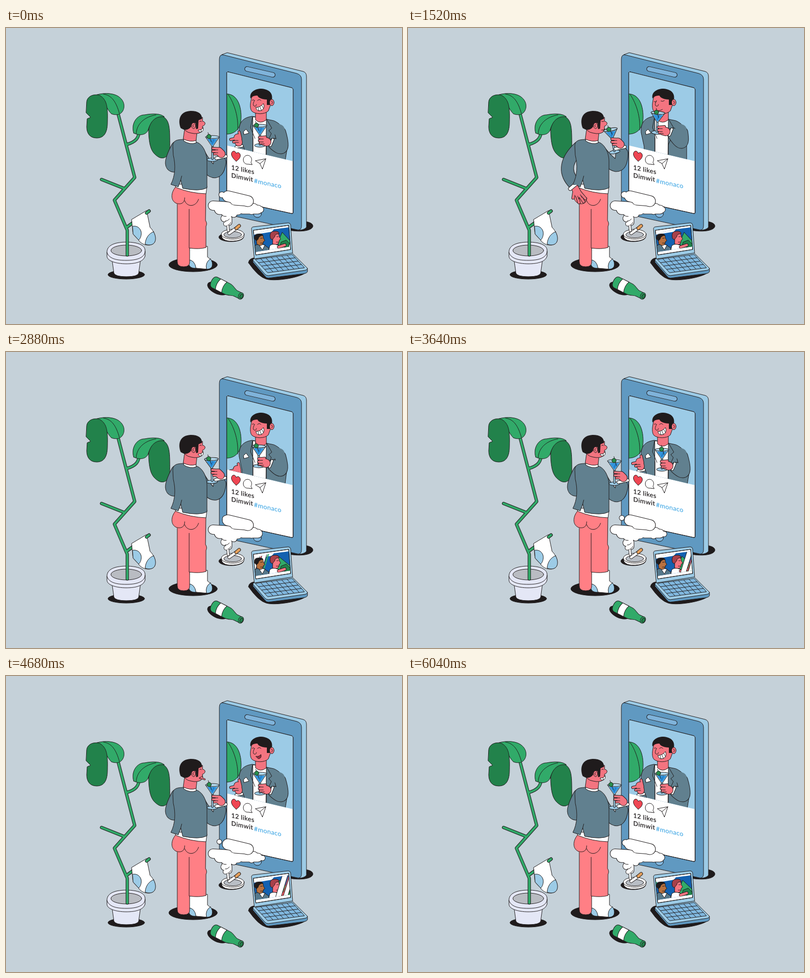
These frames come from a looping animation (800x600 px, 6.08 s). An HTML page with a canvas:

```html
<!DOCTYPE html>
<html lang="en">
<head>
<meta charset="utf-8">
<title>Cheers to the mirror</title>
<style>
html, body { margin: 0; width: 100%; height: 100%; overflow: hidden; background: #c5d1d9; }
canvas { display: block; }
</style>
</head>
<body>
<canvas id="stage" width="800" height="600"></canvas>
<script>
const c = document.getElementById('stage').getContext('2d');
const LOOP = 6080, STEP = 40, FLOW = 508;
const INK = '#1f1b1c', WHITE = '#fff', SKIN = '#f37480', PANTS = '#ff7f85', JACKET = '#61808f',
  SKY = '#9ccbe6', BLUE = '#6099c1', GREEN = '#31aa69', LEAF = '#22824b', POT = '#e4e7f6', LIQUID = '#3294dc';

c.lineCap = c.lineJoin = 'round';

// Fill and outline an SVG path
function shape(d, fill, line = INK, w = 1) {
  const p = new Path2D(d);
  if (fill) { c.fillStyle = fill; c.fill(p); }
  if (line) { c.strokeStyle = line; c.lineWidth = w; c.stroke(p); }
}
const line = (d, w = 1, col = INK) => shape(d, null, col, w);

// Thick strokes merged under one common outline
function limbs(parts, fill) {
  for (const [d, w] of parts) line(d, w + 1);
  for (const [d, w] of parts) line(d, w - 1, fill);
}
const dot = (x, y) => `M${x} ${y}h.01`;

function oval(x, y, rx, ry, fill, stroke = INK, turn = 0) {
  c.beginPath();
  c.ellipse(x, y, rx, ry, turn, 0, 7);
  if (fill) { c.fillStyle = fill; c.fill(); }
  if (stroke) { c.strokeStyle = stroke; c.lineWidth = 1; c.stroke(); }
}
function at(x, y, turn, draw) {
  c.save();
  c.translate(x, y);
  c.rotate(turn);
  draw();
  c.restore();
}
function clipped(d, draw) {
  c.save();
  c.clip(new Path2D(d));
  draw();
  c.restore();
}
const mix = (a, b, k) => a + (b - a) * k;

// Eased keyframes: rows of [time, ...values]
function pose(t, keys) {
  const i = keys.findIndex(k => k[0] > t);
  if (i < 0) return keys[keys.length - 1].slice(1);
  const a = keys[i - 1], b = keys[i];
  let k = (t - a[0]) / (b[0] - a[0]);
  k = k * k * (3 - 2 * k);
  return a.slice(1).map((v, n) => mix(v, b[n + 1], k));
}

function glass(x, y, turn, height, olive) {
  at(x, y, turn, () => {
    oval(0, height, 11, 3.5, SKY);
    limbs([[`M0 18V${height - 2}`, 3.4]], SKY);
    shape('M-14 0L-1 19H1L14 0Z', SKY);
    shape('M-10 4H10L1 17H-1Z', LIQUID, null);
    oval(0, 0, 14, 3, '#b4daef');
    line('M3 5L-1 14', 1.2, '#176bb7');
    const ox = mix(0, -7, olive);
    line(`M${ox - 2 * olive} -9L${ox + 5} 10`);
    oval(ox, -1, 4.4, 4.4, '#288e4c');
  });
}

function plant() {
  oval(243, 500, 37, 9, INK);
  shape('M214 468L218 497Q221 504 243 504Q266 504 268 497L272 468Z', POT);
  shape('M204 453C205 438 225 434 243 434C266 434 281 440 281 451V462C278 474 262 478 243 478C222 478 204 472 204 463Z', POT);
  oval(243, 451, 31, 11, '#b9bcc2');
  line('M204 455C208 468 224 471 243 471C264 471 280 466 281 453');
  limbs([['M245 460V410L219 349L260 303L227 176M238 325L193 307M245 403L289 371M244 236C263 231 268 222 269 210', 5.5]], GREEN);
  shape('M178 137C194 131 214 131 226 138C239 146 241 159 236 168C231 177 221 177 213 174C201 162 200 144 178 137Z', GREEN);
  line('M197 134C214 136 223 151 229 173');
  shape('M163 149C165 136 181 133 190 137C203 145 206 158 205 190C205 218 194 223 183 223C169 223 163 213 163 200L164 184L171 181L162 172Z', LEAF);
  shape('M258 213C252 196 263 176 280 176C296 173 312 173 320 180C302 181 292 190 287 207C283 217 270 219 258 213Z', GREEN);
  line('M263 214C264 194 280 180 303 176');
  shape('M288 207C291 188 304 178 318 180C331 188 331 205 331 240C331 260 320 267 309 262C293 253 289 239 288 207Z', LEAF);
  shape('M254 388L284 370L291 404C302 415 304 428 299 436C291 443 275 441 268 430L257 418Z', WHITE);
  shape('M256 402C264 400 271 405 273 413C274 420 272 426 268 430L257 418Z', SKY);
  shape('M298 413C304 423 303 433 298 437C293 441 287 440 281 438C282 426 288 417 298 413Z', SKY);
  limbs([['M284 375L289 371', 5.5]], GREEN);
}

function phoneMan(d, mouth, olive) {
  shape('M440 134C465 130 475 154 475 180C475 205 462 217 440 215Z', GREEN);
  line('M449 135C462 154 470 182 468 207');
  // torso
  shape(`M497 179C476 182 470 194 471 212L477 240V275H563L${mix(569, 563, d)} 238C569 210 556 194 541 188Z`, JACKET);
  shape('M499 180L526 184L525 274H499Z', WHITE);
  line('M498 180L494 202L503 224M526 184L537 203L531 208L536 214L526 236M499 222V260M526 236V262');
  shape('M480 210L485 205L491 213L481 216Z', WHITE);
  // neck and head
  shape('M504 168V186Q514 196 526 186V166Z', SKIN);
  shape('M497 138C493 151 492 164 497 169C504 175 522 176 530 168L535 154L531 130Z', SKIN);
  shape('M494 143C491 130 503 123 516 123C532 124 540 133 537 146Q532 147 533 156L527 156L527 145Q511 144 508 137Q499 136 494 143Z', INK, null);
  oval(537, 151, 4.5, 6.5, SKIN);
  line('M536 148Q540 149 537 154');
  shape('M502 147C500 151 498 156 501 158Q505 160 506 155', SKIN);
  line(d > .5 ? 'M497 149q3 2 5 0M511 148q4 2 7-1' : 'M497 147q2-3 5 0M508 147q4-4 7 0');
  if (mouth === 'grin') {
    shape('M505 161Q514 161 520 153Q524 163 516 167Q506 170 505 161Z', WHITE);
    line('M509 161L511 168M513 160L516 167M517 157L520 163', .9);
  } else if (mouth === 'sip') line('M502 167Q508 169 514 165');
  else shape(`M505 163Q511 164 515 159Q517 ${mouth} 510 ${mouth}Z`, '#9d2c40');
  // pointing hand
  at(mix(0, -6, d), mix(0, 60, d), 0, () => {
    limbs([['M474 258L472 245', 18]], JACKET);
    limbs([['M465 241L477 239', 5]], WHITE);
    limbs([['M468 222L470 232', 15], ['M468 223L454 226', 5], ['M474 224L471 211', 5], ['M460 231H470', 5]], SKIN);
    line('M461 228H469M462 232H470');
  });
  // drinking arm
  const x = mix(520, 514, d), y = mix(227, 206, d);
  limbs([[`M554 212Q${mix(568, 560, d)} ${mix(260, 252, d)} ${x + 21} ${y + 8}`, 23]], JACKET);
  line(dot(551, 207), 24, JACKET);
  limbs([[`M${x + 14} ${y + 11}L${x + 19} ${y - 1}`, 5]], WHITE);
  glass(mix(513, 505, d), mix(198, 172, d), mix(0, .06, d), 40, olive);
  limbs([[`M${x} ${y + 2}L${x + 7} ${y + 4}`, 17], [`M${x - 8} ${y - 5}L${x + 4} ${y - 6}`, 5], [dot(x - 8, y + 1), 5], [dot(x - 6, y + 6), 5]], SKIN);
  line(`M${x - 9} ${y - 2}h9M${x - 9} ${y + 4}h9M${x - 5} ${y + 8}h7`);
}

function label(text, x, y, col, weight) {
  c.save();
  c.transform(1, .2, 0, 1, x, y);
  c.font = `${weight} 13px Lato, Inter, sans-serif`;
  c.letterSpacing = '.4px';
  c.fillStyle = col;
  c.fillText(text, 0, 0);
  c.restore();
}

function phone(d, mouth, olive) {
  shape('M550 398C590 387 621 391 620 402C618 413 585 415 560 407Z', INK);
  shape('M436 54L447 50L600 88Q607 90 607 98V404Q602 410 589 410Z', SKY);
  shape('M431 63Q431 52 441 55L587 92Q597 95 597 104V401Q597 411 588 409L441 377Q431 374 431 364Z', BLUE);
  limbs([['M487 83L539 95', 9.5]], '#7fb3da');
  oval(508, 377, 8, 7, '#82b7df');
  const screen = 'M449 89L577 121Q580 122 580 125V374Q580 377 577 376L446 347V91Q446 88 449 89Z';
  shape(screen, WHITE);
  clipped('M446 88L580 122V270L446 238Z', () => {
    shape('M440 80H590V280H440Z', SKY, null);
    phoneMan(d, mouth, olive);
  });
  line(screen);
  shape('M465 270C455 262 453 254 458 250Q463 248 465 254Q470 250 473 256C475 262 470 267 465 270Z', '#ef4653');
  shape('M495 272A8.5 9 0 1 0 489 276L497 277Z', WHITE);
  shape('M504 269L525 265L518 286L513 275ZM513 275L525 265', WHITE);
  label('12 likes', 455, 287, INK, 600);
  label('Dimwit', 455, 303, INK, 600);
  label('#monaco', 501, 314, '#2f9fe2', 400);
}

function smoke(p) {
  const fade = Math.max(0, 1 - p * 1.5), grow = p > .65 ? (p - .65) / .35 : 0;
  const wob = Math.sin(p * Math.PI * 2);
  const lower = [
    ['M418 360L500 365', 19], ['M431 368L468 369', 20], ['M478 368L509 368', 18],
    [dot(496, 372 + wob), 12], [dot(446, 378), 20], [dot(460, 377 - wob), 14],
    [dot(441, 386 + wob), 14], ['M450 386L450 394', 13], [dot(444 - wob, 397), 9], ['M448 398L449 411', 4.5],
    [dot(mix(510, 514, grow), 368), 12],
  ];
  if (fade) lower.push([dot(514 + 20 * p, 368 + 5 * p), 13 * Math.sqrt(fade)]);
  limbs(lower, WHITE);
  line('M436 379q4 4 9 3M443 391q5 1 8-4M448 400q5-2 6-6');
  const upper = [['M448 341L489 351', 22], ['M462 349L488 351', 20]];
  if (grow) upper.push([dot(mix(444, 437, grow), 338), 13]);
  if (fade) upper.push([dot(436 - 24 * p, 338 - 10 * p), 12 * Math.sqrt(fade)]);
  limbs(upper, WHITE);
}

function ashtray(p) {
  oval(455, 424, 25, 9, INK);
  shape('M436 418V424Q440 433 459 432Q478 431 481 422V417Z', WHITE);
  oval(458, 418, 23, 10, WHITE);
  oval(458, 419, 18, 6.5, '#b9bec5');
  limbs([['M451 416L465 406', 6]], WHITE);
  limbs([['M465 406L471 401', 6]], '#e5a05c');
  smoke(p);
}

function laptop(p) {
  shape('M490 476C490 466 505 462 520 470L609 491C608 504 545 515 526 509Q510 505 490 476Z', INK);
  shape('M499 470L525 500L609 487L609 494Q608 497 602 498L530 507Q526 507 523 503L499 475Z', BLUE);
  shape('M500 468L578 456L609 487Q609 490 605 491L530 502Q526 502 523 499L499 471Z', SKY);
  // keyboard grid in the slanted plane of the base
  const key = (u, v) => `${504 + 74 * u + 25 * v} ${469 - 10 * u + 27 * v}`;
  shape(`M${key(0, 0)}L${key(1, 0)}L${key(1, 1)}L${key(0, 1)}Z`, '#80b7de');
  for (let k = 1; k < 7; k++) line(`M${key(k / 7, 0)}L${key(k / 7, 1)}`);
  for (let r = 1; r < 4; r++) line(`M${key(0, r / 4)}L${key(1, r / 4)}`);
  shape('M496 408Q495 404 500 403L570 395Q574 395 575 399L579 456L502 468Z', SKY);
  const screen = 'M500 410L571 400L575 449L505 460Z';
  shape(screen, WHITE);
  clipped('M500 418L533 409L572 404L574 443L504 454Z', () => {
    shape('M495 400H580V460H495Z', '#1461b0', null);
    shape('M495 400H548L537 413L495 420Z', WHITE, null);
    const h = -9 * Math.sin(p * Math.PI);
    shape(`M${551 + h} 430L${558 + h} 414L580 438V452H549Z`, GREEN);
    shape('M556 434L566 430L580 444V452H552Z', LEAF);
    // passenger in pink
    shape('M530 455L533 441Q540 436 549 440L564 445L568 455Z', WHITE);
    shape('M539 420Q540 415 546 415Q552 416 552 423L555 428L552 430Q552 438 546 439L539 438Z', SKIN);
    shape('M534 426Q531 412 542 412Q551 411 552 417Q543 417 543 423L538 429Z', '#a8404a');
    line('M547 423h3M546 434h5');
    limbs([['M551 444L563 440', 6]], SKIN);
    // posts rushing by
    at(583 - 117 * p, 426, 0, () => {
      shape('M2 -28L-16 30H-5L13 -28Z', WHITE);
      shape('M17 -28L-1 30H8L26 -28Z', WHITE);
      line('M16 -28L-3 30', 1.6, '#e34c52');
      line('M29 -28L11 30', 2.5, GREEN);
    });
    // driver
    shape('M498 458L502 441Q512 436 522 440L531 446V456Z', '#56788b');
    shape('M510 438L518 450L523 440Z', WHITE);
    shape('M505 424Q506 417 515 418Q520 419 520 426L523 431L520 433Q520 440 513 441L507 438Z', '#b8713f');
    shape('M502 428Q500 417 510 417Q518 416 520 421Q511 421 510 428L506 432Z', INK, null);
    line('M514 426h4M514 436h5');
  });
  line(screen);
}

function bottle() {
  oval(427, 528, 22, 11, INK, null, .45);
  at(416, 513, .47, () => {
    shape('M6 -12H35C43 -12 48 -7 54 -6H66V7H54C48 7 43 12 35 12H6Q-1 11 -1 0Q-1 -11 6 -12Z', GREEN);
    shape('M14 -12H28Q23 0 28 12H14Q9 0 14 -12Z', WHITE);
    oval(66, .5, 5, 7, GREEN);
    oval(67, .5, 3, 4.5, LEAF);
  });
}

function freeHand(x, y, turn, wag) {
  at(x, y, turn, () => {
    limbs([
      ['M0 -2V12', 15], ['M-6 5L-13 14', 5.5], ['M-4 14L-7 28', 5.5],
      [`M1 14L${wag} 31`, 5.5], [`M5 12L${6 + wag} 27`, 5.5],
    ], SKIN);
    line('M-3 15L-4 22M3 15L3 22', .9);
  });
}

function man(t, d, mouth, olive) {
  const scratch = t > 640 && t < 1960;
  const wag = scratch ? Math.sin(t / 240 * Math.PI) * 2.5 : 0;
  const [ex, ey, hx, hy, turn] = pose(t, [
    [0, 322, 288, 348, 286, 0], [240, 322, 288, 348, 286, 0], [500, 318, 264, 296, 312, 1],
    [600, 322, 270, 310, 320, .75], [680, 306, 280, 333, 320, -.5], [1920, 306, 280, 333, 320, -.5],
    [2080, 318, 264, 296, 312, 1], [2240, 321, 272, 308, 320, .4], [2520, 322, 288, 348, 286, 0], [LOOP, 322, 288, 348, 286, 0],
  ]);
  oval(378, 480, 49, 14, INK);
  // legs
  shape('M371 444L369 477Q371 488 385 487L408 489Q418 487 417 476Q414 468 407 464V443Z', WHITE);
  shape('M369 470Q381 470 384 487Q371 488 369 478Z', SKY);
  shape('M413 468Q419 476 416 484Q413 489 405 489Q402 475 413 468Z', SKY);
  shape('M346 350V474Q346 484 359 484Q371 484 371 475V350Z', PANTS);
  shape('M370 340V446Q390 449 404 445V402Q407 396 403 390L404 328Z', PANTS);
  shape('M343 321C332 334 333 350 344 356Q347 358 350 358V367H370Q387 361 390 349L403 336V322Z', PANTS, null);
  line('M343 322C332 334 332 352 346 356C356 358 361 353 361 344M361 350C366 364 384 363 389 347');
  // free arm passes behind the jacket
  limbs([[`M346 242Q${ex} ${ey} ${hx} ${hy - 8}`, 25]], JACKET);
  const hidden = t < 280 || t > 2480;
  const side = () => {
    const aim = Math.atan2(hy - 8 - ey, hx - ex) - Math.PI / 2;
    freeHand(hx - 8 * Math.sin(aim), hy + 6, turn, wag);
    at(hx, hy, aim, () => limbs([['M-8 1L8 1', 7]], WHITE));
  };
  if (!hidden && !scratch) side();
  // glass arm, then shirt and jacket over its shoulder
  const x = mix(430, 424, d), y = mix(249, 230, d);
  limbs([[`M386 248Q${mix(425, 431, d)} ${mix(320, 306, d)} 432 ${mix(272, 254, d)}`, 25]], JACKET);
  shape('M341 316L343 323Q372 335 404 336L406 321Z', WHITE);
  shape('M337 239C337 229 344 226 358 226L384 231C398 235 406 254 406 270V324Q391 332 357 325L353 308L348 322L333 317C342 300 343 278 338 258Z', JACKET);
  line('M353 308L355 300');
  if (scratch) clipped('M280 220H336L334 318H420V400H280Z', side);
  shape('M359 223L359 229Q372 237 384 233V226Z', WHITE);
  // neck and head
  shape('M361 204L358 225Q372 232 384 228L386 210Z', SKIN);
  shape('M357 196Q359 211 374 213Q387 216 394 211Q398 206 397 199Q403 197 402 192Q400 189 397 189L397 181H365Z', SKIN);
  shape('M353 203C347 188 350 169 373 168C389 168 396 174 396 184L389 187L388 204L384 205L383 193Q374 190 374 200Q368 208 359 206Z', INK, null);
  oval(379, 198, 4, 6, SKIN);
  line('M380 195Q376 197 379 201');
  line(d > .5 ? 'M391 189q3 2 5 0' : 'M391 190q2-3 4 0');
  if (mouth === 'grin') {
    shape('M398 202Q396 207 388 207Q390 213 396 210Q400 207 398 202Z', WHITE);
    line('M394 206L395 211', .9);
  } else if (mouth === 'sip') line('M391 207Q395 208 398 204');
  else shape('M397 203L390 207L396 209L402 211Q405 208 398 207Z', SKIN);
  // glass and hand
  glass(mix(417, 409, d), mix(221, 206, d), mix(0, -.13, d) - (scratch ? .05 : 0), 46, olive);
  limbs([[`M${x - 5} ${y + 15}L${x + 14} ${y + 11}`, 6]], WHITE);
  limbs([[`M${x} ${y + 1}L${x + 5} ${y + 6}`, 16], [`M${x - 12} ${y - 5}L${x + 2} ${y - 4}`, 5], [`M${x - 12} ${y + 1}H${x}`, 5], [`M${x - 9} ${y + 6}H${x}`, 5]], SKIN);
  line(`M${x - 12} ${y - 2}h10M${x - 11} ${y + 4}h9`);
}

function frame(now) {
  const t = Math.floor(now % LOOP / STEP) * STEP;
  const flow = t / FLOW % 1;
  const [d] = pose(t, [[0, 0], [120, 0], [480, 1], [2560, 1], [3040, 0], [LOOP, 0]]);
  const olive = mix((1 + Math.cos(t / 1520 * 2 * Math.PI)) / 2, .45, d);
  let mouth = 'grin';
  if (d > .4) mouth = 'sip';
  else if (t > 4240 && t < 5560) mouth = 169 + 2 * Math.sin(t / 160 * Math.PI);

  c.fillStyle = '#c5d1d9';
  c.fillRect(0, 0, 800, 600);
  plant();
  phone(d, mouth, olive);
  ashtray(flow);
  laptop(flow);
  bottle();
  man(t, d, mouth, olive);
  requestAnimationFrame(() => frame(performance.now() - start));
}
const start = performance.now();
frame(0);
</script>
</body>
</html>
```
